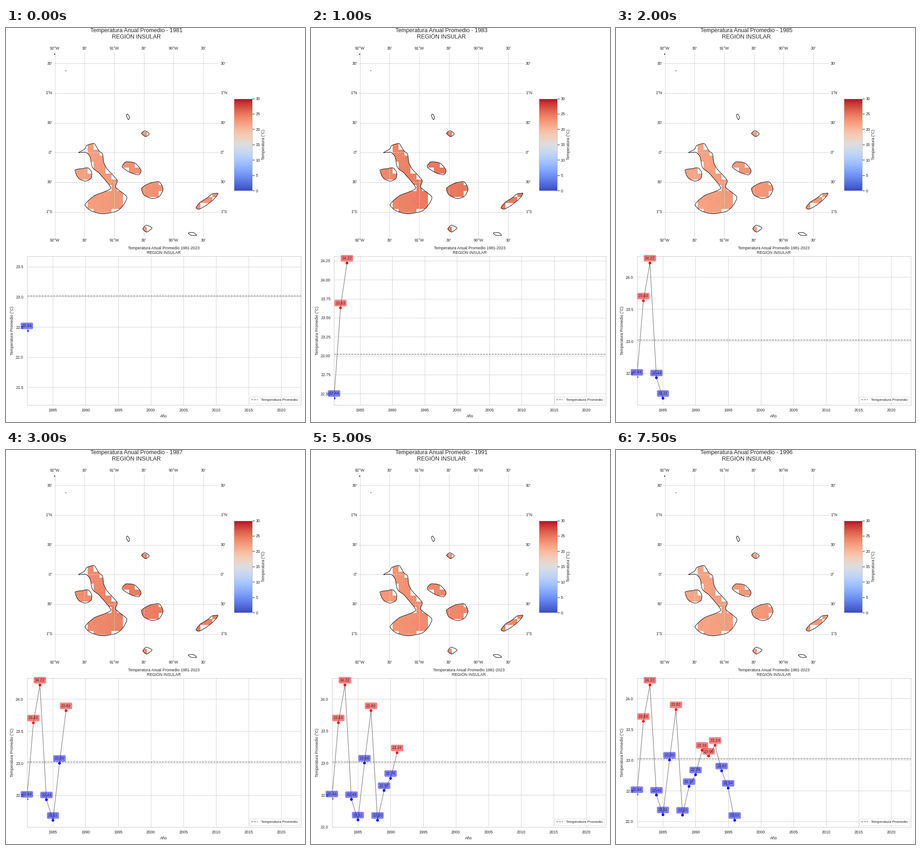
A matplotlib script for the animation above (8000 ms loop, 652 px wide and 858 px high).

```python
import numpy as np
import matplotlib.pyplot as plt
from matplotlib.animation import FuncAnimation
from matplotlib.collections import PolyCollection
from matplotlib.patches import Polygon, Rectangle
from matplotlib.path import Path

W, H, DPI = 652, 858, 64
PX = 72 / DPI          # one pixel in points
K = 0.7855 * PX        # scale of the text and line sizes
DARK, GRID = "0.15", "0.8"

plt.rcParams.update({
    "font.family": "Liberation Sans", "font.size": 11 * K,
    "text.color": DARK, "axes.labelcolor": DARK,
    "xtick.color": DARK, "ytick.color": DARK,
    "axes.labelsize": 11 * K, "axes.titlesize": 11 * K,
    "xtick.labelsize": 11 * K, "ytick.labelsize": 11 * K,
    "axes.titlepad": 6 * K, "axes.labelpad": 4 * K,
    "xtick.bottom": False, "ytick.left": False,
    "xtick.major.size": 6 * K, "ytick.major.size": 6 * K,
    "xtick.major.pad": 3.5 * K, "ytick.major.pad": 3.5 * K,
    "axes.edgecolor": GRID, "axes.linewidth": 1.25 * K,
    "axes.grid": True, "axes.axisbelow": True,
    "grid.color": GRID, "grid.linewidth": K,
    "lines.linewidth": 1.5 * K, "patch.linewidth": K,
    "legend.fontsize": 10 * K, "legend.edgecolor": GRID,
})

START, END, MEAN = 1981, 2023, 23.02
TEMPS = np.array([22.44, 23.63, 24.22, 22.43, 22.11, 23.00, 23.82, 22.104,
                  22.57, 22.76, 23.16, 23.064, 23.24, 22.824, 22.543, 22.02])
REGION = "REGIÓN INSULAR"

# Map geometry in pixels: 92°W at X0, the equator at Y0
X0, Y0, DEG = 106.6, 271.3, 129.4
LEFT, RIGHT, TOP, BOTTOM = 105, 464, 53, 454
CELL = DEG / 10

# Key points of each coast, joined by a smooth closed curve
COASTS = [
    [(158, 271), (171, 263), (176, 255), (191, 251), (196, 257), (203, 268),
     (210, 274), (213, 293), (222, 309), (242, 331), (239, 347), (263, 367),
     (254, 387), (240, 399), (210, 404), (186, 398), (172, 384), (192, 365),
     (227, 350), (221, 337), (204, 317), (188, 303), (183, 280), (173, 270)],
    [(150, 309), (165, 306), (178, 304), (186, 313), (185, 327), (172, 333),
     (157, 326)],
    [(253, 302), (261, 291), (281, 294), (294, 309), (289, 319), (272, 315)],
    [(295, 349), (304, 342), (317, 336), (334, 335), (342, 350), (334, 366),
     (318, 371), (300, 363)],
    [(414, 391), (423, 379), (436, 371), (449, 361), (462, 360), (452, 373),
     (434, 387), (421, 394)],
    [(262, 190), (265, 187), (269, 195), (266, 199)],
    [(295, 229), (303, 223), (312, 230), (304, 236)],
    [(298, 437), (305, 429), (318, 435), (306, 444)],
    [(397, 446), (408, 445), (415, 451), (403, 451)],
]
ROCKS = [(106, 56.5), (130.5, 93)]

fig = plt.figure(figsize=(W / DPI, H / DPI), dpi=DPI, facecolor="white")
bg = fig.add_axes([0, 0, 1, 1])
bg.axis("off")
rng = np.random.default_rng(4)
rasters = []


def smooth(points, steps=6, tension=0.35):
    """Closed cardinal spline with a slightly ragged edge."""
    p = np.array(points, float) + 0.5
    q = np.roll(p, -1, 0)
    m0 = tension * (q - np.roll(p, 1, 0))
    m1 = np.roll(m0, -1, 0)
    parts = [(2*t**3 - 3*t**2 + 1) * p + (t**3 - 2*t**2 + t) * m0
             + (3*t**2 - 2*t**3) * q + (t**3 - t**2) * m1
             for t in np.arange(steps) / steps]
    curve = np.stack(parts, 1).reshape(-1, 2)
    return curve + rng.uniform(-0.3, 0.3, curve.shape)


def draw_islands():
    col, row = [a.ravel() for a in np.meshgrid(np.arange(3, 29),
                                               np.arange(-14, 8))]
    centers = np.column_stack([X0 + col * CELL, Y0 - row * CELL])
    corners = CELL / 2 * np.array([(-1, -1), (1, -1), (1, 1), (-1, 1)])
    # the east is warmer than the west
    warm = 0.6 * np.tanh((col - 8.5) / 4) - 0.02 * np.maximum(0, col - 17)
    warm = warm + rng.uniform(-0.12, 0.12, col.size)
    for points in COASTS:
        coast = smooth(points)
        shape = bg.add_patch(Polygon(coast, fill=False, ec="black",
                                     lw=0.95 * PX, joinstyle="round", zorder=3))
        land = Path(coast, closed=False).contains_points(centers + 2)
        if not land.any():
            continue
        cells = PolyCollection(centers[land][:, None] + corners,
                               cmap="coolwarm", linewidths=0,
                               antialiaseds=False, zorder=1)
        cells.set_clim(0, 30)
        bg.add_collection(cells, autolim=False)
        cells.set_clip_path(shape)
        rasters.append((cells, warm[land]))
    for x, y in ROCKS:
        bg.add_patch(Rectangle((x - 0.7, y - 1), 1.4, 2, fc="black", lw=0))


def draw_graticule():
    style = dict(color=GRID, lw=K, zorder=2, solid_capstyle="butt")
    for n, name in enumerate(["92°W", "30′", "91°W", "30′", "90°W", "30′"]):
        x = X0 + n * DEG / 2
        bg.plot([x, x], [TOP, BOTTOM], **style)
        bg.text(x, TOP - 4, name, ha="center", va="bottom")
        bg.text(x, BOTTOM + 4, name, ha="center", va="top")
    for n, name in enumerate(["30′", "1°N", "30′", "0°", "30′", "1°S"]):
        y = Y0 + (n - 3) * DEG / 2
        bg.plot([LEFT, RIGHT], [y, y], **style)
        bg.text(LEFT - 4, y, name, ha="right", va="center")
        bg.text(RIGHT + 4, y, name, ha="left", va="center")


def draw_colorbar():
    x, y, w, h = 497.3, 153.5, 40, 200.7
    levels = np.linspace(0, 30, 256)[:, None]
    bg.pcolormesh([x, x + w], np.linspace(y + h, y, 257), levels,
                  cmap="coolwarm", vmin=0, vmax=30)
    bg.add_patch(Rectangle((x, y), w, h, fill=False, ec=GRID, lw=1.25 * K))
    for t in range(0, 31, 5):
        ty = y + h * (1 - t / 30)
        bg.plot([x + w, x + w + 4.7], [ty, ty], color=DARK, lw=1.25 * K,
                solid_capstyle="butt")
        bg.text(x + w + 7.5, ty, str(t), va="center_baseline")
    bg.text(562, y + h / 2, "Temperatura (°C)", rotation=90,
            ha="center", va="center")


draw_islands()
draw_graticule()
draw_colorbar()
title = bg.text((LEFT + RIGHT) / 2, 23, "", fontsize=16 * K, ha="center",
                va="baseline")
bg.set(xlim=(0, W), ylim=(H, 0))
ax = fig.add_axes([0.1, 0.1, 0.8, 0.3])


def draw_chart(n):
    years, temps = START + np.arange(n), TEMPS[:n]
    ax.clear()
    ax.plot(years, temps, color="gray")
    ax.axhline(MEAN, color="dimgray", ls="--", label="Temperatura Promedio")
    colors = ["red" if t > MEAN else "blue" for t in temps]
    ax.scatter(years, temps, s=(6 * PX) ** 2, c=colors, linewidths=0, zorder=2.2)
    for year, temp, color in zip(years, temps, colors):
        ax.annotate(f"{temp:.2f}", (year, temp), xytext=(0, 10 * K),
                    textcoords="offset points", ha="center",
                    annotation_clip=False,
                    bbox=dict(boxstyle="round,pad=0.3", fc=color, ec="none",
                              alpha=0.5))
    lo, hi = temps.min(), temps.max()
    if n == 1:
        lo, hi = lo * 0.95, hi * 1.05
    pad = 0.05 * (hi - lo)
    ax.set(xlim=(START, END), ylim=(lo - pad, hi + pad), xlabel="Año",
           ylabel="Temperatura Promedio (°C)",
           title=f"Temperatura Anual Promedio {START}-{END}\n{REGION}")
    ax.xaxis.set_major_locator(plt.MultipleLocator(5))
    # two-decimal tick labels need a wider margin
    wide = np.isclose(np.diff(ax.get_yticks())[0], 0.25)
    left, right, top, bottom = 50.2 if wide else 45.5, 642.8, 497, 821
    ax.set_position([left / W, 1 - bottom / H, (right - left) / W,
                     (bottom - top) / H])
    ax.legend(loc="lower right")


def draw(k):
    title.set_text(f"Temperatura Anual Promedio - {START + k}\n{REGION}")
    for cells, warm in rasters:
        cells.set_array(TEMPS[k] + warm)
    draw_chart(k + 1)
    return []


anim = FuncAnimation(fig, draw, frames=len(TEMPS), interval=500,
                     init_func=lambda: draw(0), repeat=True, repeat_delay=0)
plt.show()
```
